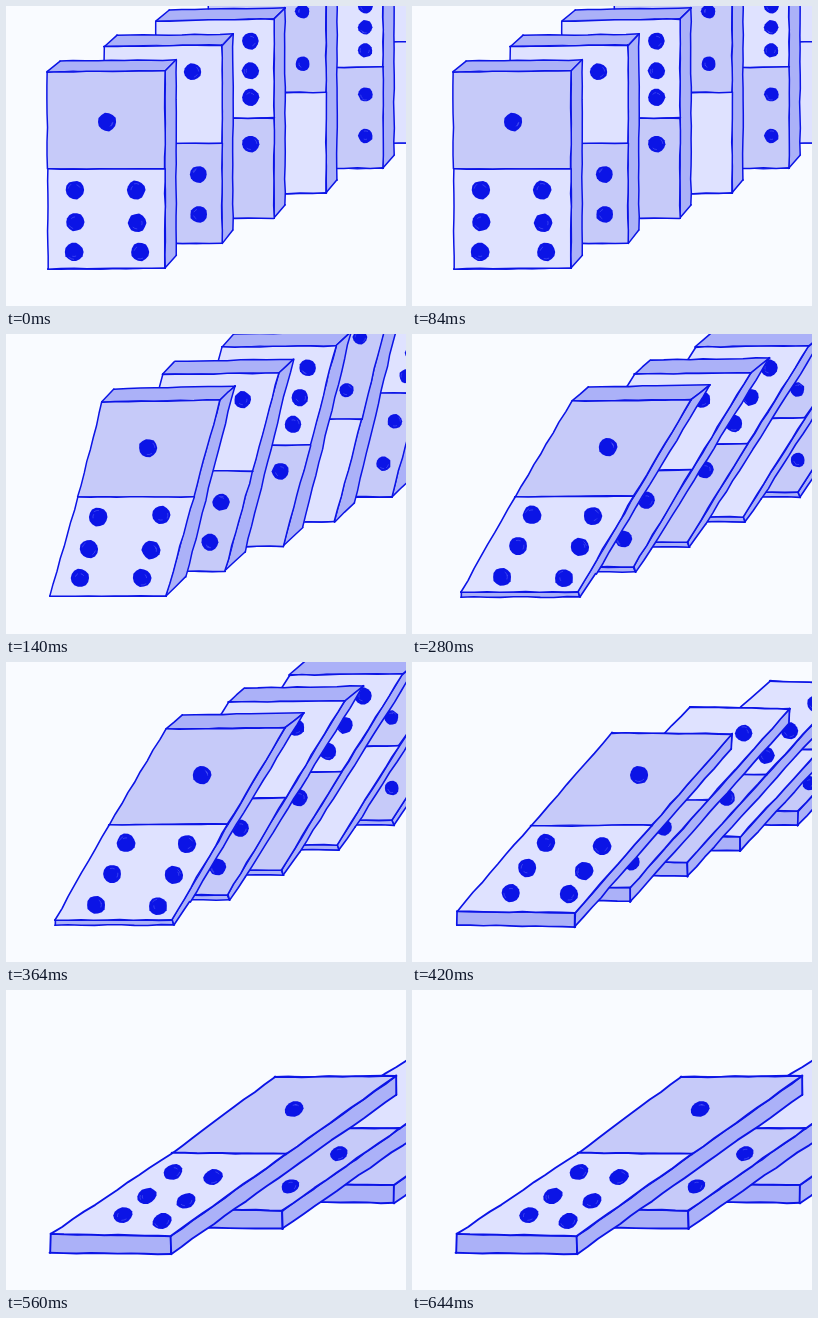
Recreate the animation shown at these times as an HTML page with a canvas. Size 400 px wide and 300 px high, loop 0.7 s.

```html
<!DOCTYPE html>
<html lang="en">
<head>
<meta charset="utf-8">
<title>Falling dominoes</title>
<style>
html, body { margin: 0; width: 100%; height: 100%; overflow: hidden; background: #f9fbff; }
canvas { display: block; width: 400px; height: 300px; }
</style>
</head>
<body>
<canvas id="stage" width="400" height="300"></canvas>
<script>
const ctx = document.getElementById('stage').getContext('2d');
const PAPER = '#f9fbff', LIGHT = '#dfe2ff', MID = '#c6caf9', SIDE = '#abb1f8', INK = '#0b14e6';
const HOLD = 140;

// Vertical pip positions in the visible column of each half, from the nearest tile back.
const tiles = [
  { top: MID, bottom: LIGHT },
  { top: LIGHT, bottom: MID, topPips: [.27], bottomPips: [.31, .71], topShift: -.05 },
  { top: LIGHT, bottom: MID, topPips: [.22, .52, .79], bottomPips: [.26] },
  { top: MID, bottom: LIGHT, topPips: [.18, .71], bottomPips: [] },
  { top: LIGHT, bottom: MID, topPips: [.39, .6, .83], bottomPips: [.27, .68], shift: .05 },
  { top: LIGHT, bottom: LIGHT, topPips: [], bottomPips: [] }
];

// front: TL TR BR BL; mid: left right; rim: back TL, back TR, side foot, low right, low left.
// step: spacing to the next tile for the TL, TR and bottom corners.
const poses = [];
const addPose = pose => poses.push(pose);

addPose({
  front: [[41, 66], [159, 65], [159, 262], [42, 263]], mid: [[41.5, 163], [159, 163]],
  rim: [[54, 55], [170, 54], [170, 249], [159, 262], [42, 263]],
  step: [[54.5, -25.5], [54.5, -26], [54.5, -25]], nudge: [0, 2.5, 0, -2.5, 0, 0],
  pips: [[101, 116], [69, 184], [130, 184], [69, 216], [131, 217], [68, 246], [134, 246]],
  column: .8, pen: 1.5
});
addPose({
  front: [[96, 68], [214, 66], [160, 262], [44, 262]], mid: [[72, 163], [188, 163]],
  rim: [[108, 55], [229, 52], [180, 243], [160, 262], [44, 262]],
  step: [[58, -27.5], [56, -27], [56.5, -24.8]], nudge: [0, 2.5, 4, -1, 0, 0],
  pips: [[142, 114], [92, 183], [155, 181], [83, 215], [145, 216], [74, 244], [136, 244]],
  column: .8, pen: 1.5
});
addPose({
  front: [[160, 67], [279, 66], [166, 258], [49, 258]], mid: [[103, 163], [222, 162]],
  rim: [[176, 53], [298, 51], [184, 240], [168, 263], [49, 263]],
  step: [[62, -27], [59, -27], [55, -25]], nudge: [0, .5, -.5, 0, 0, 0],
  pips: [[196, 113], [120, 181], [181, 182], [106, 212], [168, 213], [90, 243], [152, 244]],
  column: .77, pen: 1.6
});
addPose({
  front: [[200, 71], [320, 72], [163, 251], [45, 249]], mid: [[119, 164], [240, 163]],
  rim: [[200, 71], [319, 87], [163, 265], [163, 265], [45, 263]],
  step: [[78.5, -26], [58, -25], [55.7, -25.4]], nudge: [0, -.5, 1, -2, 0, 0],
  pips: [[227, 113], [134, 181], [190, 184], [115, 206], [172, 209], [99, 231], [157, 232]],
  column: .815, pen: 1.7
});
addPose({
  front: [[269, 87], [390, 86], [165, 246], [45, 244]], mid: [[166, 163], [280, 164]],
  rim: [[269, 87], [390, 105], [165, 264], [165, 264], [44, 263]],
  step: [[143, -24], [116, -26], [111.5, -25.5]], nudge: [0, 0, 0, 0, 0, 0],
  pips: [[288, 119], [167, 182], [207, 187], [141, 206], [180, 211], [117, 225], [156, 231]],
  column: .77, pen: 1.9, flat: true
});

let seed = 1;
function random() {
  seed = (seed * 16807) % 2147483647;
  return seed / 2147483647;
}
const wobble = size => (random() - .5) * size;
const mix = (a, b, t) => [a[0] + (b[0] - a[0]) * t, a[1] + (b[1] - a[1]) * t];

function penLine(a, b) {
  const parts = Math.max(1, Math.round(Math.hypot(b[0] - a[0], b[1] - a[1]) / 13));
  ctx.beginPath();
  for (let i = 0; i <= parts; i++) {
    const [x, y] = mix(a, b, i / parts);
    ctx.lineTo(x + wobble(.9), y + wobble(.9));
  }
  ctx.stroke();
}

function face(points, color) {
  ctx.beginPath();
  points.forEach(p => ctx.lineTo(...p));
  ctx.closePath();
  ctx.fillStyle = color;
  ctx.fill();
  points.forEach((p, i) => penLine(p, points[(i + 1) % points.length]));
}

function pip([x, y], radius, flat) {
  ctx.save();
  ctx.translate(x, y);
  if (flat) {
    ctx.rotate(-.4);
    ctx.scale(1.08, .82);
  }
  ctx.beginPath();
  for (let i = 0; i < 14; i++) {
    const angle = i * Math.PI / 7, r = radius + wobble(.9);
    ctx.lineTo(r * Math.cos(angle), r * Math.sin(angle));
  }
  ctx.closePath();
  ctx.fillStyle = INK;
  ctx.fill();
  ctx.strokeStyle = 'rgba(150,157,255,.6)';
  ctx.lineWidth = .5;
  for (let i = 0; i < 2; i++) {
    const start = random() * 6.3;
    ctx.beginPath();
    ctx.arc(0, 0, radius * (.45 + random() * .35), start, start + .7);
    ctx.stroke();
  }
  ctx.restore();
}

function drawTile(pose, index) {
  const tile = tiles[index];
  const [left, right, foot] = pose.step;
  const move = (p, s) => [p[0] + s[0] * index + pose.nudge[index], p[1] + s[1] * index];
  const [tl, tr, br, bl] = pose.front.map((p, i) => move(p, [left, right, foot, foot][i]));
  const [backL, backR, sideFoot, lowR, lowL] =
    pose.rim.map((p, i) => move(p, [left, right, foot, foot, foot][i]));
  const midL = move(pose.mid[0], mix(left, foot, .5));
  const midR = move(pose.mid[1], mix(right, foot, .5));

  ctx.strokeStyle = INK;
  ctx.lineWidth = pose.pen;
  face([tl, backL, backR, tr], SIDE);
  face([bl, br, lowR, lowL], SIDE);
  face([tr, backR, sideFoot, lowR, br], SIDE);
  face([tl, tr, midR, midL], tile.top);
  face([midL, midR, br, bl], tile.bottom);

  if (index === 0) {
    pose.pips.forEach(p => pip(p, 9.2, pose.flat));
    return;
  }
  const column = pose.column + (tile.shift || 0);
  const radius = index > 2 ? 7.2 : 8.5;
  const place = (a, b, c, d, u, v) => pip(mix(mix(a, d, v), mix(b, c, v), u), radius, pose.flat);
  tile.topPips.forEach(v => place(tl, tr, midR, midL, column + (tile.topShift || 0), v));
  tile.bottomPips.forEach(v => place(midL, midR, br, bl, column, v));
}

function drawPose(number) {
  seed = 4321 + number * 977;
  ctx.fillStyle = PAPER;
  ctx.fillRect(0, 0, 400, 300);
  for (let i = tiles.length - 1; i >= 0; i--) drawTile(poses[number], i);
}

ctx.lineJoin = ctx.lineCap = 'round';
let shown = -1;
function tick() {
  const number = Math.floor(performance.now() / HOLD) % poses.length;
  if (number !== shown) drawPose(shown = number);
  requestAnimationFrame(tick);
}
tick();
</script>
</body>
</html>
```
